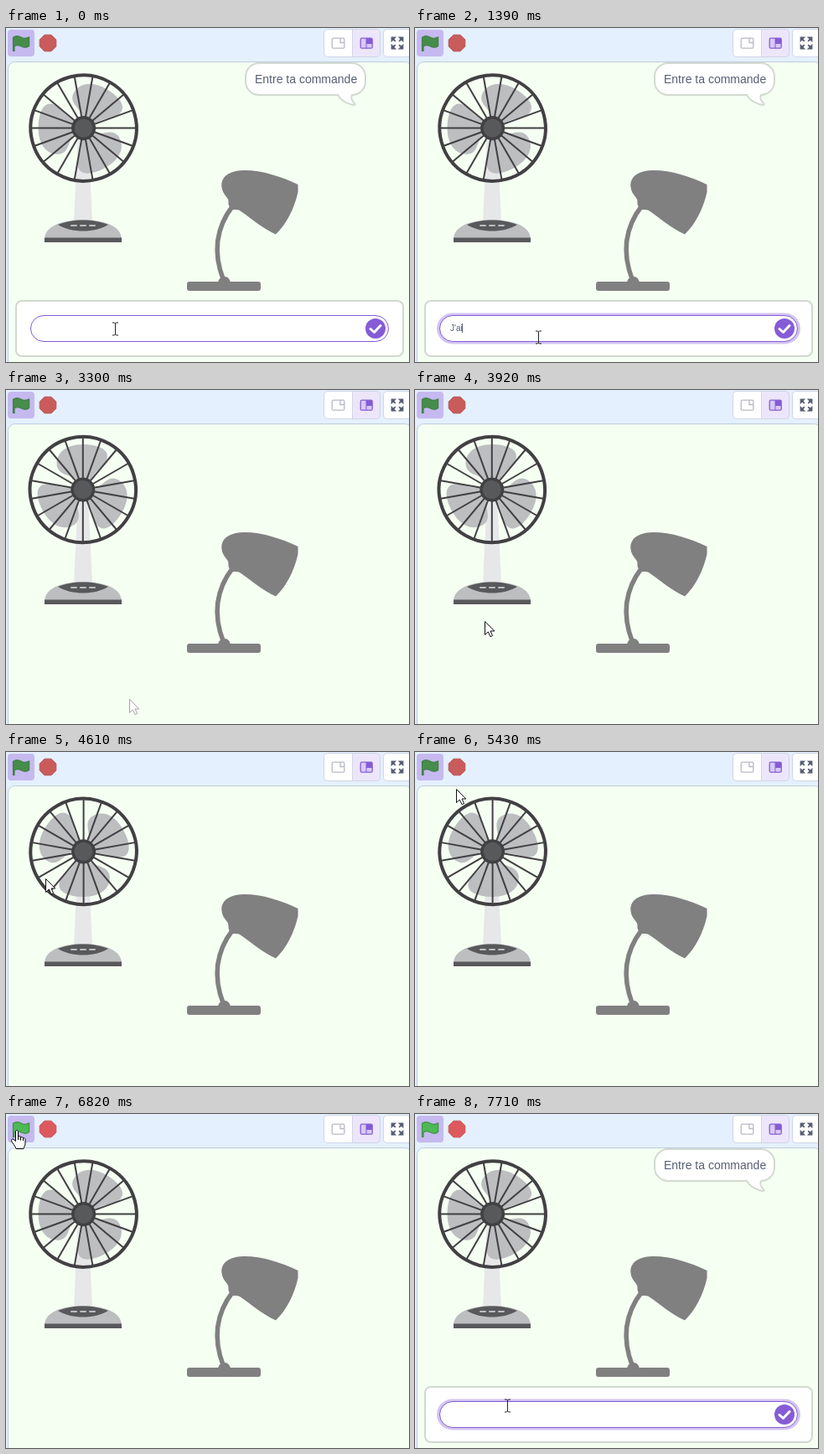
Write an HTML page that moves like this. It is 481 by 399 pixels and loops after 8000 ms.

```html
<!DOCTYPE html>
<html lang="fr">
<head>
<meta charset="utf-8">
<title>Entre ta commande</title>
<style>
html, body { margin: 0; width: 100%; height: 100%; overflow: hidden; background: #e5f0ff; }
svg { display: block; width: 481px; height: 399px; }
text { font-family: "Liberation Sans", Arial, sans-serif; fill: #575e75; white-space: pre; }
</style>
</head>
<body>
<svg viewBox="0 0 481 399" xmlns="http://www.w3.org/2000/svg">
  <rect width="481" height="399" fill="#e5f0ff"/>
  <rect x="2.5" y="40.5" width="482" height="380" rx="8" fill="#f5fff2" stroke="#bccde2"/>

  <!-- toolbar -->
  <rect id="flagBg" x="2" y="2" width="32" height="32" rx="4"/>
  <rect id="stopBg" x="34" y="2" width="32" height="32" rx="4" fill="#d5d8f7"/>
  <path id="flag" stroke-width="1.2" stroke-linejoin="round" stroke-linecap="round"
    d="M8.5 11.2C12 8.6 15 9.2 18 11C21 12.8 24 12.8 27.6 10.8V21.4C24 23.8 21 23.6 18 21.8C15 20.2 12.5 20.2 10 21.8V27.4H8.5Z"/>
  <path id="stop" stroke-width="1" stroke-linejoin="round"
    d="M46 8.2H54L59.8 14V22L54 27.8H46L40.2 22V14Z"/>
  <rect x="379.5" y="1.5" width="67" height="33" rx="4" fill="#fff"/>
  <path d="M413.5 1.5H442.5A4 4 0 0 1 446.5 5.500V30.500A4 4 0 0 1 442.500 34.500H413.500Z" fill="#ede6fa"/>
  <path d="M413.500 2V34" stroke="#d3d5e6"/>
  <rect x="379.5" y="1.500" width="67" height="33" rx="4" fill="none" stroke="#d0d5e2"/>
  <rect x="450.5" y="1.5" width="40" height="33" rx="4" fill="#fff" stroke="#d0d5e2"/>
  <g fill="none" stroke="#b7b9c6" stroke-width="1.3">
    <rect x="389.2" y="12.200" width="14.600" height="12" rx="1.500"/>
    <path d="M399 12.500V17.500H403.500"/>
  </g>
  <rect x="423.2" y="12.2" width="14" height="12" rx="1.5" fill="#d9c9f6" stroke="#855cd6" stroke-width="1.3"/>
  <path d="M430 12.200H437V19H430Z" fill="#855cd6"/>
  <path d="M430 12V24" stroke="#855cd6"/>
  <g id="expand" fill="#575e75" stroke="#575e75" stroke-width="1.8"></g>

  <!-- fan -->
  <path d="M86 125H98L103 232H81Z" fill="#e6e7e8"/>
  <path d="M46 251C47 241 57 234 70 231.500C84 228.500 101 228.500 114 231.500C127 234 137 241 138 251Z" fill="#bcbec0"/>
  <path d="M62 235C78 227.500 106 227.500 122 235C106 245 78 245 62 235Z" fill="#58595b"/>
  <path d="M78 236H84M89 236H95M100 236H106" stroke="#bcbec0" stroke-width="2" stroke-linecap="round"/>
  <rect x="46" y="250.500" width="92" height="5.500" fill="#58595b"/>
  <g id="wheel">
    <g id="blades" fill="#bcbec0"></g>
    <g id="spokes" stroke="#414042" stroke-width="2"></g>
    <circle r="63.2" fill="none" stroke="#414042" stroke-width="4"/>
    <circle r="14.5" fill="#414042"/>
    <circle r="11" fill="#58595b"/>
  </g>

  <!-- lamp -->
  <g fill="#808080">
    <rect x="216" y="303" width="88" height="11" rx="3"/>
    <path d="M253 304C254 299 257 297 261 297C265 297 267 300 268 304Z"/>
    <path d="M259.500 301C249 274 247 243 271 212" fill="none" stroke="#808080" stroke-width="5.500"/>
    <path d="M257.500 190C256 178 266 170.500 283 170C304 169.500 328 177 348.500 187V196C344 216 335 234 322 246.500C307 240 292 227 279 218C276 216 270 219 267 214C264 209 267 207 264 203C260 198 258 195 257.500 190Z"/>
  </g>

  <!-- question -->
  <g id="ask">
    <path d="M302 42H413A16 16 0 0 1 429 58V64A16 16 0 0 1 413 80C411 84 413 87 416 90C418 92 415 92.500 411 91C404 89 399 85 396 80H302A16 16 0 0 1 286 64V58A16 16 0 0 1 302 42Z" fill="#fff" stroke="#d3dad1" stroke-width="2"/>
    <text x="297" y="66" font-size="14">Entre ta commande</text>
    <rect x="12" y="326" width="462" height="66" rx="7" fill="#fff" stroke="#d2d9d0" stroke-width="2"/>
    <rect id="glow" x="26" y="340.500" width="434" height="37" rx="18.500" fill="#d3c4f1"/>
    <rect x="29.500" y="343.500" width="427" height="31" rx="15.500" fill="#fff" stroke="#855cd6"/>
    <text id="typed" x="42" y="362" font-size="10"></text>
    <rect id="caret" y="353" width="1" height="11" fill="#575e75"/>
    <circle cx="441" cy="359" r="12" fill="#855cd6"/>
    <path d="M435 359.500L439.500 363.500L447 355.500" fill="none" stroke="#fff" stroke-width="3" stroke-linecap="round" stroke-linejoin="round"/>
  </g>

  <!-- pointers, each with its hot spot at 0,0 -->
  <path id="beam" d="M-3.500 -7.500H-1L0 -6.500L1 -7.500H3.500M0 -6.500V6.500M-3.500 7.500H-1L0 6.500L1 7.500H3.500" fill="none" stroke="#222"/>
  <path id="arrow" d="M.5 .5V16.500L4.300 13L7 18.700L9.600 17.500L7 12H11.800Z" fill="#fff"/>
  <path id="hand" d="M-1.500 1C-1.500 -1 1.500 -1 1.500 1V7C2 6 4.500 6 4.500 8C5.500 7 7.500 7.500 7.500 9C8.500 8 10 9 10 10.500V15C10 18 8.500 19 8 21.500H-1C-1 19 -6.500 14 -6.500 11.500C-6.500 9.500 -4 9.500 -3 11L-1.500 12.500ZM1.500 7V11M4.500 8V11.500M7.500 9V12" fill="#fff" stroke="#000"/>
</svg>
<script>
const LOOP = 8000, CLEARED = 2530, STOPPED = 6190, RESTART = 6820, ASKED = 7090;
const PHRASE = "J'ai chaud";
const KEY_TIMES = [800, 1060, 1260, 1390, 1530, 1730, 1930, 2030, 2130, 2330];
const ADVANCE = [5, 1.91, 5.56, 2.22, 2.78, 5, 5.56, 5.56, 5.56, 5.56];
const TURNS = [[2529, 0], [2531, 1], [2660, 2], [3300, 11], [4610, 29], [5430, 41], [6120, 52]];
const HUBS = [[92.6, 119.6], [92.6, 118.9], [91.8, 119.6], [91.8, 119]];
const PATH = [
  [0, 130, 359], [70, 130, 359], [340, 147, 369], [3330, 147, 369], [4120, 52, 232],
  [4540, 47, 151], [4960, 47, 151], [5400, 49, 39], [5620, 47, 29], [5850, 43, 27],
  [6200, 43, 27], [6330, 40, 68], [6470, 36, 94], [6700, 16, 28], [6820, 13, 20],
  [7030, 13, 20], [7370, 109, 346], [7580, 109, 346], [7700, 111, 349]
];
const POINTERS = [[0, "beam"], [2530, "arrow"], [5620, "hand"], [6260, "arrow"],
  [6690, "hand"], [7100, "arrow"], [7290, "beam"]];

const $ = id => document.getElementById(id);
const set = (id, attrs) => Object.entries(attrs).forEach(([k, v]) => $(id).setAttribute(k, v));
const show = (id, on) => set(id, { visibility: on ? "inherit" : "hidden" });
const repeat = (n, make) => Array.from({ length: n }, (_, i) => make(i)).join("");

// Linear interpolation in rows of [time, ...values]
function at(rows, t) {
  const i = rows.findIndex(r => r[0] > t);
  if (i < 0) return rows.at(-1).slice(1);
  if (i === 0) return rows[0].slice(1);
  const a = rows[i - 1], b = rows[i], u = (t - a[0]) / (b[0] - a[0]);
  return a.slice(1).map((v, k) => v + (b[k + 1] - v) * u);
}

$("blades").innerHTML = repeat(3, i => `<path transform="rotate(${i * 120})"
  d="M-6 -10C-14 -19 -28 -16 -31 -28C-33 -42 -22 -54 0 -54C18 -54 31 -48 29 -38C27 -28 14 -24 9 -10Z"/>`);
$("spokes").innerHTML = repeat(18, i => `<path transform="rotate(${i * 20})" d="M0 -13V-62"/>`);
$("expand").innerHTML = repeat(4, i => `<path transform="translate(467 18) rotate(${i * 90})"
  d="M2.200 -2.200L5 -5M3 -6.500H6.500V-3Z"/>`);

function draw(now) {
  const t = now % LOOP;
  const asking = t < CLEARED || t >= ASKED;
  const running = t < STOPPED || t >= RESTART;
  const fresh = t >= STOPPED;

  const turn = Math.floor(at(TURNS, t)[0] + 1e-6);
  const [hx, hy] = HUBS[turn % 4];
  set("wheel", { transform: `translate(${hx} ${hy}) rotate(${30 + turn % 4 * 30})` });

  set("flagBg", { fill: running ? "#c5b9ef" : t > 6690 ? "#d5d8f7" : "none" });
  set("flag", { fill: fresh ? "#4cb955" : "#468c4b", stroke: fresh ? "#409140" : "#3f8044" });
  set("stop", { fill: fresh ? "#dc595d" : "#c95b5b", stroke: fresh ? "#ce5459" : "#b95353", opacity: running ? 1 : .5 });
  show("stopBg", t >= 5620 && t < 6260);

  show("ask", asking);
  const typing = t < CLEARED;
  const count = typing ? KEY_TIMES.filter(k => k <= t).length : 0;
  show("glow", t >= 70);
  $("typed").textContent = PHRASE.slice(0, count);
  const width = ADVANCE.slice(0, count).reduce((a, b) => a + b, 0);
  set("caret", { x: Math.floor(42 + width + 1e-6) });
  const caretOn = typing ? t >= 70 && !(t >= 600 && t < 800) : t < 7640;
  $("caret").setAttribute("visibility", asking && caretOn ? "visible" : "hidden");

  const tick = Math.max(0, Math.floor((t + 10) / 69) * 69);
  const [x, y] = at(PATH, tick).map(Math.round);
  const kind = POINTERS.filter(p => p[0] <= t).at(-1)[1];
  for (const id of ["beam", "arrow", "hand"]) show(id, id === kind);
  const half = kind === "beam" ? .5 : 0;
  set(kind, { transform: `translate(${x + half} ${y + half})` });
  set("arrow", { stroke: t >= CLEARED && t < 3370 ? "#a3a5a3" : "#111" });
}

const start = performance.now();
function loop() {
  draw(performance.now() - start);
  requestAnimationFrame(loop);
}
loop();
</script>
</body>
</html>
```
